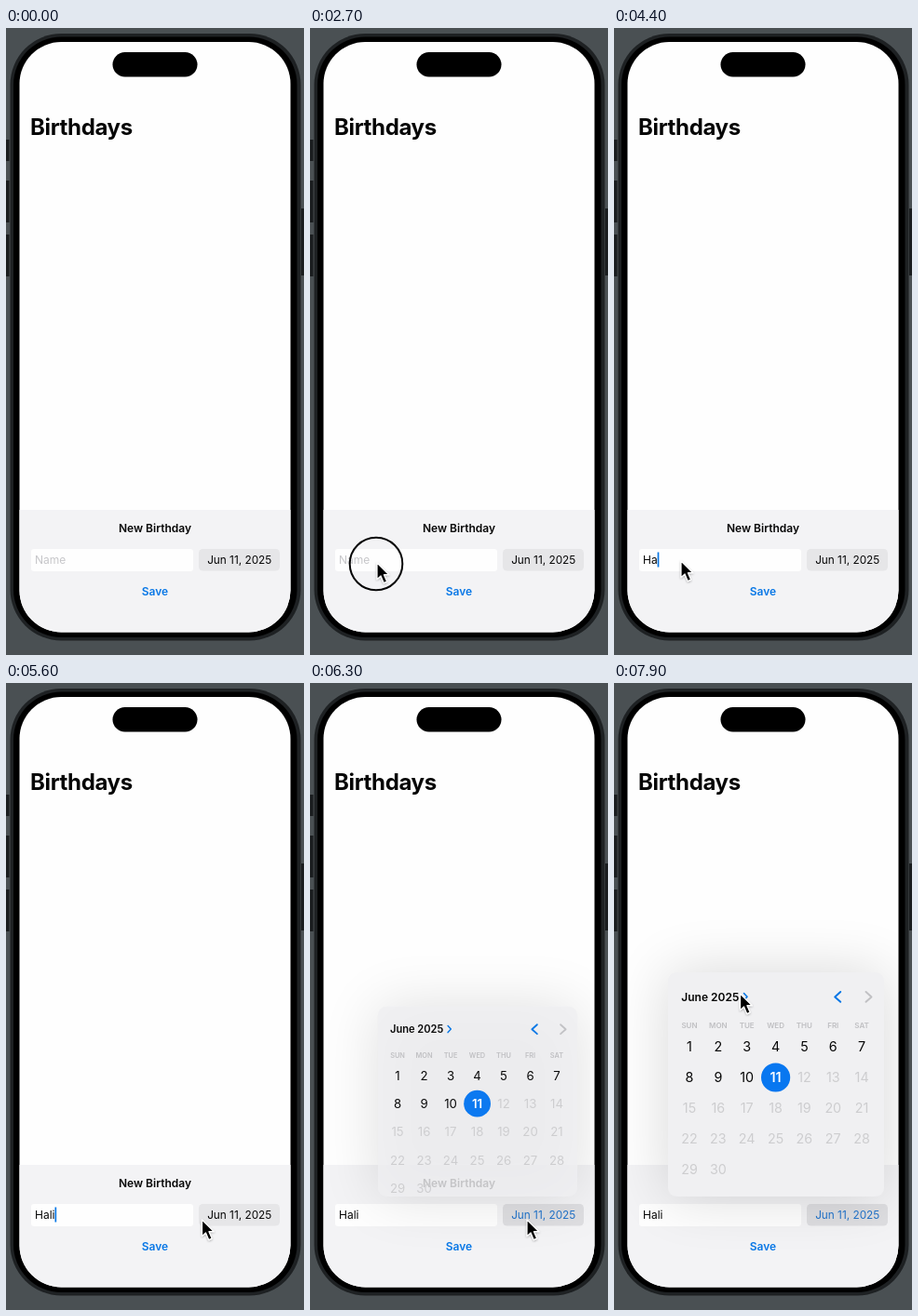
Animation of 320 by 674 pixels, one loop 8000 ms. Source, as an HTML page:

```html
<!DOCTYPE html>
<html lang="en">
<head>
<meta charset="utf-8">
<title>Birthdays</title>
<style>
  html, body { margin: 0; width: 100%; height: 100%; overflow: hidden; background: #4a5053; }
  svg { display: block; width: 320px; height: 674px; }
  text { font-family: Inter, "Liberation Sans", sans-serif; font-size: 12px; fill: #060606; }
  .semi { font-weight: 600; }
  .mid { text-anchor: middle; }
  .title { font-size: 24px; font-weight: 700; letter-spacing: -.35px; }
  .week { font-size: 8px; font-weight: 600; fill: #bfbfc2; }
  .day { font-size: 14.3px; }
  .off { fill: #cdcdcf; }
  .picked { fill: #fff; font-weight: 600; }
  .blue { fill: #0877e6; }
  .hint { fill: #c6c6c9; }
  .chev { fill: none; stroke: #0877e6; stroke-linecap: round; stroke-linejoin: round; }
</style>
</head>
<body>
<svg viewBox="0 0 320 674">
  <defs>
    <clipPath id="screen"><rect x="14.5" y="15" width="291" height="634.5" rx="45"/></clipPath>
    <clipPath id="cardClip"><rect id="cardEdge" rx="9"/></clipPath>
    <filter id="soft" x="-60%" y="-60%" width="220%" height="220%"><feGaussianBlur stdDeviation="31"/></filter>
    <filter id="drop" x="-40%" y="-40%" width="190%" height="190%">
      <feDropShadow dx="0" dy="1" stdDeviation="1" flood-opacity=".3"/>
    </filter>
  </defs>

  <rect width="320" height="674" fill="#4a5053"/>
  <g fill="#1a1d1f">
    <rect x="0" y="120" width="3.5" height="23"/>
    <rect x="0" y="164" width="3.5" height="45"/>
    <rect x="0" y="222" width="3.5" height="45"/>
    <rect x="317" y="194" width="3" height="72"/>
  </g>
  <rect x="4.5" y="6" width="312" height="652.5" rx="55" fill="#1e2123"/>
  <rect x="8" y="9.5" width="304.5" height="645.5" rx="51.5" fill="#000"/>

  <g clip-path="url(#screen)">
    <rect x="14" y="14" width="293" height="637" fill="#fefefe"/>
    <text class="title" x="26" y="114.5">Birthdays</text>
    <rect x="14" y="518" width="293" height="133" fill="#f3f3f5"/>
    <text class="semi mid" x="160" y="541.7">New Birthday</text>
    <rect x="27" y="560" width="174" height="24" rx="3" fill="#fefefe"/>
    <rect id="pill" x="207" y="560" width="87" height="23.5" rx="4.5"/>
    <rect id="shade" filter="url(#soft)"/>
    <text id="hint" class="hint" x="31" y="576">Name</text>
    <text id="name" x="31" y="576"></text>
    <rect id="caret" y="563.5" width="1.7" height="16" fill="#0877e6"/>
    <text id="date" class="mid" x="250.7" y="576" style="font-size:11.8px">Jun 11, 2025</text>
    <text class="semi mid blue" x="160" y="610">Save</text>

    <g id="card">
      <rect id="cardFill" rx="9" fill="#f0f0f2"/>
      <g clip-path="url(#cardClip)"><g id="month">
        <text class="semi" x="72.3" y="341.5">June 2025</text>
        <path class="chev" stroke-width="1.6" d="M139.5 333.5l3.5 3.8-3.5 3.8"/>
        <path class="chev" stroke-width="2" d="M243.2 332l-6 5.4 6 5.4"/>
        <path class="chev" stroke-width="2" d="M270.5 332l6 5.4-6 5.4" style="stroke:#c1c1c4"/>
        <circle cx="173.6" cy="424" r="15.6" fill="#0877f0"/>
      </g></g>
    </g>
  </g>

  <rect x="114.5" y="26" width="91" height="26.5" rx="13.25" fill="#000"/>
  <circle id="ring" r="28.3" fill="none" stroke="#060606" stroke-width="2"/>
  <path id="arrow" d="M0 0V17.6L4 14L7.2 21.6L10.6 20.1L7.4 12.7H12.8Z"
        fill="#000" stroke="#fff" stroke-width="1.2" stroke-linejoin="round" filter="url(#drop)"/>
</svg>

<script>
const LOOP = 8000;
const $ = id => document.getElementById(id);
const set = (el, props) => { for (const k in props) el.setAttribute(k, props[k]); };
const show = (el, on) => { el.style.display = on ? "" : "none"; };

function label(cls, x, y, str) {
  const el = document.createElementNS("http://www.w3.org/2000/svg", "text");
  set(el, { class: cls, x, y });
  el.textContent = str;
  $("month").append(el);
}

const column = i => 81 + 30.85 * i;
"SUN MON TUE WED THU FRI SAT".split(" ").forEach((d, i) => label("week mid", column(i), 371, d));
for (let d = 1; d <= 30; d++) {
  const i = d - 1;
  const cls = d === 11 ? "picked" : d > 11 ? "off" : "";
  label("day mid " + cls, column(i % 7), 396.2 + 33 * Math.floor(i / 7), d);
}

// pointer stops: time, x, y
const stops = [
  [1800, 330, 500], [2500, 72, 575], [3000, 72, 575], [3300, 72, 573],
  [5150, 72, 573], [5600, 210.5, 577], [5850, 233, 577],
  [6550, 233, 577], [7600, 135.5, 334]
];
const clicks = [[2550, 2900], [5900, 6200]];
const keys = [4150, 4350, 4600, 4800];
const OPEN = 6200;

function pointer(t) {
  const n = stops.findIndex(s => s[0] > t);
  if (n < 0) return stops[stops.length - 1].slice(1);
  if (n === 0) return null;
  const [t0, x0, y0] = stops[n - 1], [t1, x1, y1] = stops[n];
  const u = (t - t0) / (t1 - t0), e = u * u * (3 - 2 * u);
  // sideways motion lags a little, so the path bends
  return [x0 + (x1 - x0) * e ** 1.25, y0 + (y1 - y0) * e];
}

function drawField(t) {
  const typed = "Hali".slice(0, keys.filter(k => t >= k).length);
  $("name").textContent = typed;
  show($("hint"), !typed);
  const focused = t >= 2800 && t < OPEN;
  show($("caret"), focused && (t - 2100) % 1100 < 600);
  if (focused) set($("caret"), { x: 31 + (typed ? $("name").getComputedTextLength() : 0) });
}

function drawCard(t) {
  const open = t >= OPEN;
  show($("card"), open);
  show($("shade"), open);
  $("date").style.fill = open ? "#1f6fc4" : "";
  set($("pill"), { fill: open ? "#dedee1" : "#e6e6e8" });
  if (!open) return;
  const k = .4 * Math.exp((OPEN - t) / 61);
  const s = 1 - k, w = 232 * s, h = 241 * (1 - 2 * k);
  const right = 290 - 38 * k, top = 552 - h;
  const alpha = 1 - 2.4 * k;
  const box = { x: right - w, y: top, width: w, height: h };
  [$("cardEdge"), $("cardFill"), $("shade")].forEach(el => set(el, box));
  // the clip applies outside the scaled group
  set($("month"), { transform: `translate(${right} ${top}) scale(${s}) translate(-290 -311)` });
  $("cardFill").style.opacity = alpha;
  $("month").style.opacity = Math.min(1, 1.2 * alpha);
  $("shade").style.opacity = .15 * alpha;
}

function drawPointer(t) {
  const p = pointer(t);
  const down = p && clicks.some(([a, b]) => t >= a && t < b);
  show($("arrow"), p);
  show($("ring"), down);
  if (p) set($("arrow"), { transform: `translate(${p[0]} ${p[1]})` });
  if (down) set($("ring"), { cx: p[0] - 1, cy: p[1] + 1 });
}

const start = performance.now();
function frame() {
  const t = Math.max(0, performance.now() - start) % LOOP;
  drawField(t);
  drawCard(t);
  drawPointer(t);
  requestAnimationFrame(frame);
}
frame();
</script>
</body>
</html>
```
